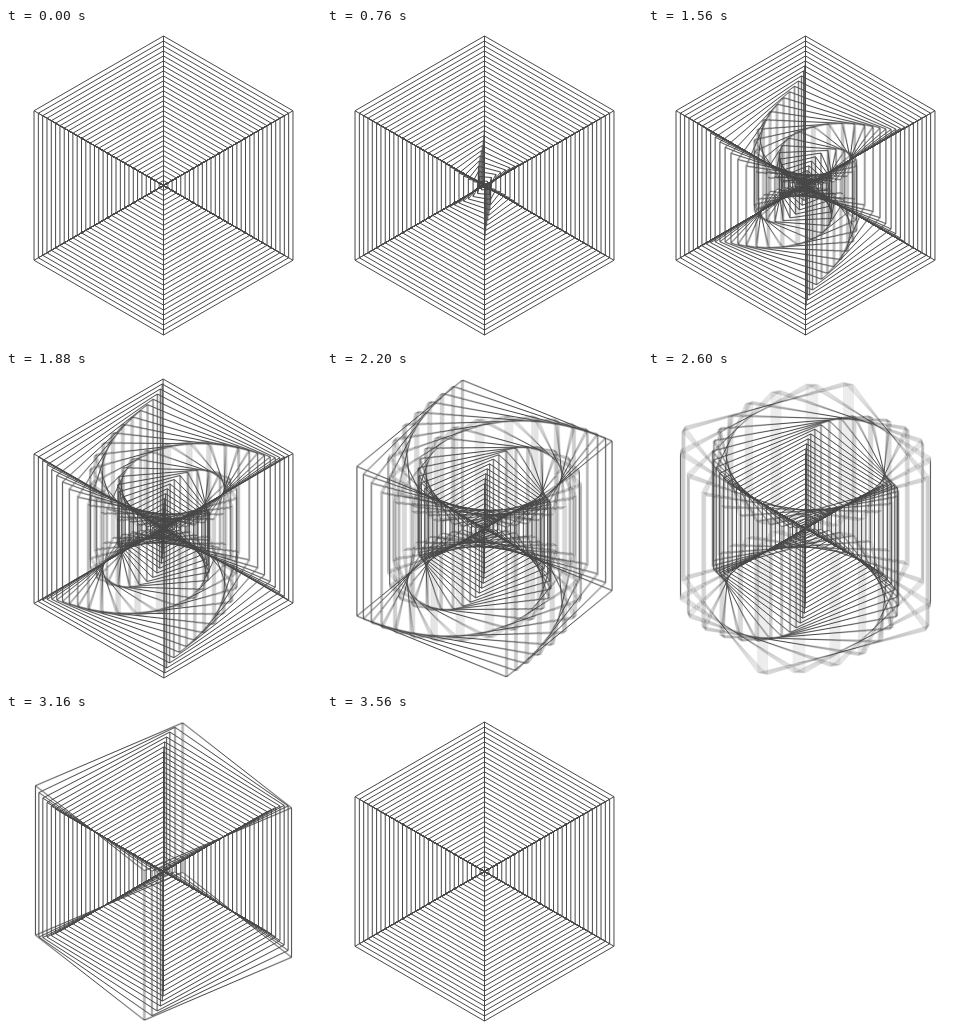
These frames come from a looping animation (315 by 315 pixels, 3600 ms). An HTML page with a canvas:

```html
<!DOCTYPE html>
<html lang="en">
<head>
<meta charset="utf-8">
<title>Nested cubes</title>
<style>
  html, body { margin: 0; height: 100%; overflow: hidden; background: #fff; }
  canvas { display: block; width: 315px; height: 315px; }
</style>
</head>
<body>
<canvas id="stage" width="315" height="315"></canvas>
<script>
const SIZE = 315, CENTER = SIZE / 2, RADIUS = 149.5;
const LOOP = 3600, STEP = 80, SHUTTER = 20, SAMPLES = 10;
const CUBES = 30, TURN = 1800;

const stage = document.getElementById('stage').getContext('2d');
const layer = document.createElement('canvas');
layer.width = layer.height = SIZE;
const pen = layer.getContext('2d');

const ease = u => u < 0.5 ? 4 * u ** 3 : 1 - 4 * (1 - u) ** 3;
const clamp = u => Math.min(1, Math.max(0, u));

// Isometric wireframe cube, turned about its vertical axis
function addCube(scale, angle) {
  const half = RADIUS * scale / 2;
  const corner = (q, side) => {
    const a = angle + q * Math.PI / 2;
    return [
      CENTER + half * Math.sqrt(3) * Math.cos(a),
      CENTER + half * (side - Math.sin(a))
    ];
  };
  for (const side of [-1, 1]) {
    for (let q = 0; q < 4; q++) {
      if (q) pen.lineTo(...corner(q, side));
      else pen.moveTo(...corner(q, side));
    }
    pen.closePath();
  }
  for (let q = 0; q < 4; q++) {
    pen.moveTo(...corner(q, -1));
    pen.lineTo(...corner(q, 1));
  }
}

function drawCubes(time) {
  pen.fillStyle = '#fff';
  pen.fillRect(0, 0, SIZE, SIZE);
  pen.strokeStyle = '#484848';
  pen.lineWidth = 1;
  pen.beginPath();
  for (let i = 1; i <= CUBES; i++) {
    const scale = i / CUBES;
    const u = clamp((time - scale * (LOOP - TURN)) / TURN);
    addCube(scale, Math.PI * ease(u));
  }
  pen.stroke();
}

// Motion blur: running average of moments while the shutter is open
function drawFrame(time) {
  for (let i = 0; i < SAMPLES; i++) {
    drawCubes(time + SHUTTER * (i + 0.5) / SAMPLES);
    stage.globalAlpha = 1 / (i + 1);
    stage.drawImage(layer, 0, 0);
  }
}

let shown = -1;
function tick() {
  const step = Math.max(0, Math.floor((performance.now() % LOOP - STEP / 2) / STEP));
  if (step !== shown) {
    shown = step;
    drawFrame(step ? (step + 0.75) * STEP : 0);
  }
  requestAnimationFrame(tick);
}
tick();
</script>
</body>
</html>
```
